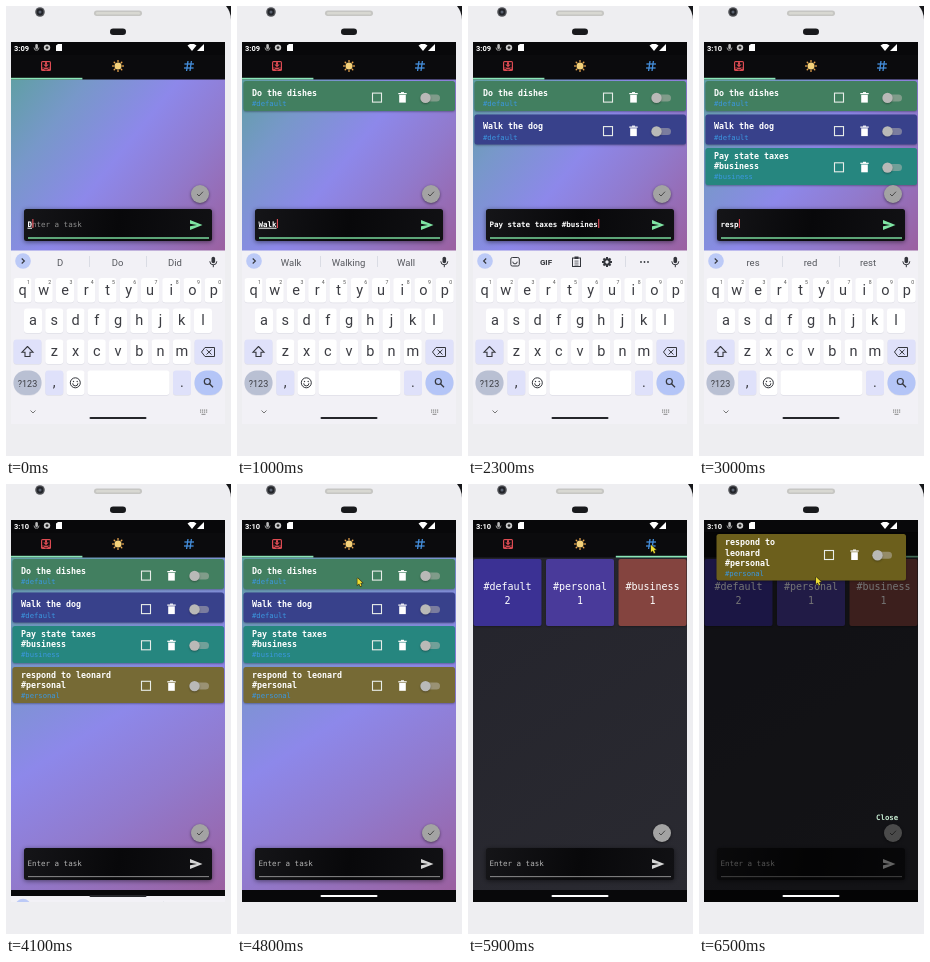
An HTML page with a canvas that plays this animation: 225 by 450 pixels, repeating every 6600 ms.

```html
<!DOCTYPE html>
<html lang="en">
<head>
<meta charset="utf-8">
<title>Task list demo</title>
<style>
html, body { margin: 0; width: 100%; height: 100%; overflow: hidden; background: #eeeef1; }
canvas { display: block; width: 225px; height: 450px; }
</style>
</head>
<body>
<canvas id="stage"></canvas>
<script>
const W = 225, H = 450, LOOP = 6600, STEP = 100;
const MONO = '"DejaVu Sans Mono", "Noto Sans Mono", monospace';
const SANS = 'Roboto, Arial, sans-serif';
const GREEN = '#7fe5a4', BLUE = '#3b97e0', INK = '#34363c';
const canvas = document.getElementById('stage');
const ratio = window.devicePixelRatio || 1;
canvas.width = W * ratio;
canvas.height = H * ratio;
const c = canvas.getContext('2d');
c.scale(ratio, ratio);

// from/to: typing time, add: when the card appears, first: letters at the start
const tasks = [
  { text: 'Do the dishes', from: 0, to: 500, add: 700, first: 1, y: 75, h: 30, color: '#427f60',
    lines: ['Do the dishes'], tag: '#default' },
  { text: 'Walk the dog', from: 900, to: 1400, add: 1500, first: 2, y: 108.5, h: 30, color: '#38418b',
    lines: ['Walk the dog'], tag: '#default' },
  { text: 'Pay state taxes #business', from: 1600, to: 2330, add: 2600, first: 1, y: 142, h: 37, color: '#26867f',
    lines: ['Pay state taxes', '#business'], tag: '#business' },
  { text: 'respond to leonard #personal', from: 2900, to: 3800, add: 4000, first: 1, y: 183, h: 36, color: '#766a35',
    lines: ['respond to leonard', '#personal'], tag: '#personal' }
];
const hints = {
  D: ['D', 'Do', 'Did'], Do: ['Do', 'Don', 'Done'], the: ['the', 'there', 'they'],
  di: ['did', 'do', 'different'], dish: ['dish', 'dishes', 'dished'], Wa: ['Was', 'Want', 'Wait'],
  Walk: ['Walk', 'Walking', 'Wall'], dog: ['dog', 'dogs', 'does'], Pay: ['Pay', 'Paying', 'Pat'],
  state: ['state', 'states', 'stated'], tax: ['tax', 'taxes', 'taxi'], re: ['re', 'red', 'really'],
  resp: ['res', 'red', 'rest'], respond: ['respond', 'responds', 'response'], to: ['to', 'too', 'today']
};
const mousePath = [[4400, 150, 230], [4900, 113, 60], [5200, 113, 60], [5500, 163, 69],
  [5650, 183, 61], [5900, 183, 61], [6200, 112, 104], [6400, 115, 98], [6500, 117, 93]];

const clamp = v => Math.max(0, Math.min(1, v));
const ease = v => { v = clamp(v); return v * v * (3 - 2 * v); };

function rect(x, y, w, h, color) {
  c.fillStyle = color;
  c.fillRect(x, y, w, h);
}
function round(x, y, w, h, r, color) {
  c.fillStyle = color;
  c.beginPath();
  c.roundRect(x, y, w, h, r);
  c.fill();
}
function disc(x, y, r, color) {
  c.fillStyle = color;
  c.beginPath();
  c.arc(x, y, r, 0, 7);
  c.fill();
}
function ring(x, y, r, color, lw = 1) {
  c.strokeStyle = color;
  c.lineWidth = lw;
  c.beginPath();
  c.arc(x, y, r, 0, 7);
  c.stroke();
}
function path(points, color, lw) {
  c.beginPath();
  for (let i = 0; i < points.length; i += 2) c.lineTo(points[i], points[i + 1]);
  if (lw) {
    c.strokeStyle = color;
    c.lineWidth = lw;
    c.stroke();
  } else {
    c.fillStyle = color;
    c.fill();
  }
}
function box(x, y, w, h, color, lw = 1) {
  c.strokeStyle = color;
  c.lineWidth = lw;
  c.strokeRect(x, y, w, h);
}
function label(s, x, y, font, color, align = 'left') {
  c.font = font;
  c.fillStyle = color;
  c.textAlign = align;
  c.textBaseline = 'alphabetic';
  c.fillText(s, x, y);
}
function shadowed(draw, blur = 2, dark = .3) {
  c.save();
  c.shadowColor = `rgba(0,0,0,${dark})`;
  c.shadowBlur = blur * ratio;
  c.shadowOffsetY = ratio;
  draw();
  c.restore();
}
function at(x, y, draw) {
  c.save();
  c.translate(x, y);
  draw();
  c.restore();
}

function drawBody() {
  rect(0, 0, W, H, '#16171a');
  round(-5, -8, 230, 500, 22, '#eeeef1');
  disc(34, 6, 4.8, '#55565b');
  disc(34, 6, 3.4, '#222429');
  disc(34, 6, 1.5, '#5a6270');
  round(88, 4.5, 48, 5.5, 2.7, '#c6c6c3');
  round(90, 6, 44, 2.5, 1.2, '#d8d8d2');
  round(104, 22.5, 16, 6.5, 3.2, '#18191c');
}

function drawStatus(t) {
  rect(5, 36, 214, 13, '#08080a');
  at(0, -.4, () => {
    label(t < 2600 ? '3:09' : '3:10', 8, 45, 'bold 7.5px ' + SANS, '#fff');
    round(29.3, 38.5, 2.6, 5, 1.3, '#bbb');
    path([28, 42, 29, 44.5, 32, 44.5, 33, 42], '#bbb', .8);
    disc(41, 42, 3.2, '#ccc');
    disc(41, 42, 1.4, '#222');
    path([50, 40, 52, 38.5, 56, 38.5, 56, 45.5, 50, 45.5], '#fff');
    path([181.5, 40, 184, 38.5, 188, 38.5, 190.5, 40, 186, 45.5], '#fff');
    path([191, 45.5, 198, 45.5, 198, 38.5], '#fff');
  });
}

function drawTabs(pos) {
  rect(5, 48, 214, 25.5, '#0b0b0d');
  at(40, 60, () => {
    const red = '#dc4b52';
    round(-5, -5, 10, 10, 1.5, red);
    rect(-3.8, -3.8, 7.6, 5.4, '#0b0b0d');
    rect(-1, -3.8, 2, 2.4, red);
    path([-2.8, -1.6, 2.8, -1.6, 0, 1.2], red);
    path([-3.8, 2.6, -2, 2.6, -1, 3.8, 1, 3.8, 2, 2.6, 3.8, 2.6], '#0b0b0d', .7);
  });
  at(112, 60, () => {
    for (let i = 0; i < 8; i++) {
      c.save();
      c.rotate(i * Math.PI / 4);
      rect(-.6, -6, 1.2, 2.2, '#eda84e');
      c.restore();
    }
    disc(0, 0, 3.5, '#f5d27a');
  });
  at(183, 60, () => {
    const col = '#458fdc';
    path([-1, -5, -2.4, 5], col, 1.3);
    path([2.4, -5, 1, 5], col, 1.3);
    path([-4.6, -2, 5, -2], col, 1.3);
    path([-5, 2, 4.6, 2], col, 1.3);
  });
  rect(5 + pos * 71.4, 71.8, 71.4, 1.7, '#8be6b8');
}

function drawTools(x, y) {
  box(x - 4.5, y - 4.5, 9, 9, '#e8ede9', 1.1);
  const tx = x + 25.5;
  rect(tx - 3.3, y - 2.8, 6.6, 7.8, '#fff');
  rect(tx - 4.2, y - 4.6, 8.4, 1.2, '#fff');
  rect(tx - 1.5, y - 5.5, 3, 1.2, '#fff');
  round(x + 45, y - 3.2, 18, 7, 3.5, 'rgba(190,185,180,.5)');
  shadowed(() => disc(x + 48.5, y + .3, 5.2, '#b9b9b7'));
}

function drawCard(k, x, y, w, h, lines, tx, ty, bx, by) {
  shadowed(() => round(x, y, w, h, 2.5, k.color));
  lines.forEach((s, i) => label(s, tx, ty + i * 10.7, 'bold 8.3px ' + MONO, '#fff'));
  label(k.tag, tx, ty + lines.length * 10.4, '7.2px ' + MONO, BLUE);
  drawTools(bx, by);
}

function fillPage(bottom, stops) {
  const g = c.createLinearGradient(5, 73, 219, bottom);
  stops.forEach(([p, col]) => g.addColorStop(p, col));
  rect(5, 73, 214, bottom - 73, g);
}

function drawPages(t, pos, bottom) {
  c.save();
  c.beginPath();
  c.rect(5, 73, 214, bottom - 73);
  c.clip();
  const page = (i, draw) => {
    if (Math.abs(i - pos) < 1) at((i - pos) * 214, 0, draw);
  };
  page(0, () => {
    fillPage(bottom, [[0, '#609fa5'], [.22, '#7798c9'], [.48, '#8d88ea'], [.7, '#917acd'], [1, '#9b60a0']]);
    for (const k of tasks) {
      if (t < k.add) continue;
      c.save();
      c.globalAlpha = clamp((t - k.add + 100) / 200);
      const tall = k.lines.length > 1;
      drawCard(k, 6.5, k.y, 211.5, k.h, k.lines, 15, k.y + (tall ? 10.5 : 14.8), 140, k.y + k.h / 2 + (tall ? .8 : 1.6));
      c.restore();
    }
  });
  page(1, () => fillPage(bottom, [[0, '#a0a67c'], [.22, '#7ba06d'], [.42, '#4d8856'], [.6, '#377847'], [1, '#34704a']]));
  page(2, () => {
    fillPage(bottom, [[0, '#24242c'], [1, '#2a2a31']]);
    const groups = [['#default', 2, '#3b3194'], ['#personal', 1, '#493a9a'], ['#business', 1, '#84443f']];
    groups.forEach(([name, n, col], i) => {
      const x = 5.5 + i * 72.5;
      shadowed(() => round(x, 75, 68, 67, 2, col));
      label(name, x + 34, 106, '10px ' + MONO, '#fff', 'center');
      label(n, x + 34, 120, '10px ' + MONO, '#fff', 'center');
    });
  });
  c.restore();
}

function typed(t) {
  const k = tasks.find(v => t >= v.from && t < v.add);
  if (!k) return ['', k];
  const p = clamp((t - k.from) / (k.to - k.from));
  return [k.text.slice(0, Math.round(k.first + p * (k.text.length - k.first))), k];
}

function drawInput(t, bottom, text, task) {
  const focus = t < 4000;
  const y = bottom - 42;
  shadowed(() => disc(194, y - 15, 9, '#a3a3a3'), 3, .5);
  path([191, y - 15, 193, y - 13, 197, y - 17.3], '#4a4a4a', 1);
  shadowed(() => {
    const g = c.createLinearGradient(18, y, 206, y + 32);
    g.addColorStop(0, '#151518');
    g.addColorStop(.5, '#08080a');
    g.addColorStop(1, '#111114');
    round(18, y, 188, 32, 2.5, g);
  }, 5, .5);
  rect(22, y + 28.3, 181, focus ? 1.4 : .8, focus ? GREEN : '#aaa');
  const font = '7.5px ' + MONO, base = y + 17.5;
  if (!text) label('Enter a task', 21.5, base, font, '#b4b4b4');
  if (t < 100) label('Enter a task', 21.5, base, font, '#8d8d8d');
  label(text, 21.5, base, 'bold ' + font, '#fff');
  if (focus) {
    const wide = c.measureText(text).width;
    if (task && task.y < 120 && text.length < task.text.length) {
      const start = c.measureText(text.slice(0, text.lastIndexOf(' ') + 1)).width;
      rect(21.5 + start, base + 1.2, wide - start, 1, '#fff');
    }
    rect(21.8 + wide, base - 7.5, 1.1, 9, '#e8505b');
  }
  path([184, y + 11, 196.5, y + 16, 184, y + 21, 184, y + 17.2, 191, y + 16, 184, y + 14.8],
    focus ? GREEN : '#d6d6d6');
}

function suggestions(text) {
  const w = text.slice(text.lastIndexOf(' ') + 1);
  if (!w || w[0] === '#') return null;
  for (let s = w; s; s = s.slice(0, -1)) if (hints[s]) return hints[s];
  return [w, w + 's', w + 'ed'];
}

function drawStrip(text) {
  const words = suggestions(text);
  disc(17, 255, 7.8, '#bccaf7');
  if (words) {
    path([15.7, 252.5, 18.4, 255, 15.7, 257.5], INK, 1.1);
    words.forEach((s, i) => label(s, 54 + i * 57.5, 260, '9.5px ' + SANS, '#55575d', 'center'));
    rect(83, 250, .7, 11, '#d0d3dd');
    rect(140, 250, .7, 11, '#d0d3dd');
  } else {
    path([18.2, 252.5, 15.6, 255, 18.2, 257.5], INK, 1.1);
    c.strokeStyle = INK;
    c.lineWidth = 1;
    c.beginPath();
    c.roundRect(42.8, 251.5, 8.5, 8.5, 1.5);
    c.stroke();
    c.beginPath();
    c.arc(47, 255.7, 2.2, 0, Math.PI);
    c.stroke();
    label('GIF', 78, 259, 'bold 8px ' + SANS, INK, 'center');
    box(104.5, 252, 8, 8.5, INK);
    rect(106.5, 250.5, 4, 2.5, INK);
    for (const y of [255, 257, 259]) rect(106.5, y - .3, 4, .7, INK);
    at(139, 256, () => {
      for (let i = 0; i < 8; i++) {
        c.rotate(Math.PI / 4);
        rect(-1, -5, 2, 3, INK);
      }
      ring(0, 0, 2.7, INK, 2);
    });
    for (const x of [173, 176.5, 180]) disc(x, 256, .9, INK);
    rect(157, 250, .7, 11, '#d0d3dd');
  }
  round(205.5, 250.8, 3.6, 6.5, 1.8, INK);
  c.strokeStyle = INK;
  c.lineWidth = 1;
  c.beginPath();
  c.arc(207.3, 255.3, 3.5, 0, Math.PI);
  c.stroke();
  rect(206.8, 258.5, 1, 2.7, INK);
}

function key(x, y, w, ch, color = '#fff', r = 3, size = 14.5) {
  round(x, y + .8, w, 24.5, r, '#dfdfe7');
  round(x, y, w, 24.5, r, color);
  if (ch) label(ch, x + w / 2, y + 16.9, size + 'px ' + SANS, '#3c3d43', 'center');
}

function drawKeyboard(shift, text) {
  at(0, shift, () => {
    rect(5, 244.5, 214, 176, '#f2f1f6');
    drawStrip(text);
    [...'qwertyuiop'].forEach((ch, i) => {
      const x = 7.5 + i * 21.25;
      key(x, 272, 18, ch);
      label((i + 1) % 10, x + 15, 278, '5.2px ' + SANS, '#555', 'center');
    });
    [...'asdfghjkl'].forEach((ch, i) => key(18 + i * 21.25, 302.5, 18, ch));
    [...'zxcvbnm'].forEach((ch, i) => key(39.3 + i * 21.25, 333.5, 18, ch));
    key(7.5, 333.5, 28, '', '#dfe1fa');
    path([21.5, 340.5, 27, 346.2, 24, 346.2, 24, 350.5, 19, 350.5, 19, 346.2, 16, 346.2, 21.5, 340.5], INK, 1.1);
    key(188.5, 333.5, 28, '', '#dfe1fa');
    path([195.5, 346, 199, 341.5, 208.5, 341.5, 208.5, 350.5, 199, 350.5, 195.5, 346], INK, 1);
    path([200.5, 343.7, 205.5, 348.5], INK, 1);
    path([205.5, 343.7, 200.5, 348.5], INK, 1);
    key(7.5, 364.5, 28, '?123', '#b9c0d3', 12, 9);
    key(39.3, 364.5, 18, ',', '#dfe1fa');
    key(60.5, 364.5, 18, '');
    ring(69.3, 376.8, 5, INK, 1);
    disc(67.5, 375.5, .7, INK);
    disc(71.2, 375.5, .7, INK);
    c.beginPath();
    c.arc(69.3, 377.3, 2.6, 0, Math.PI);
    c.stroke();
    key(81.5, 364.5, 82, '');
    key(167, 364.5, 18, '.', '#dfe1fa');
    key(188.5, 364.5, 28, '', '#b4c5f7', 12);
    ring(201.3, 375.5, 3, INK, 1.2);
    path([203.5, 377.7, 207, 381.2], INK, 1.3);
    path([24.5, 404.5, 27, 407, 29.5, 404.5], '#777', 1);
    for (let i = 0; i < 8; i++) rect(194 + i % 4 * 2, 403.5 + (i >> 2) * 2, 1.2, 1.2, '#888');
    rect(195.5, 407.8, 4, 1, '#888');
  });
}

function drawDialog(a) {
  if (a <= 0) return;
  c.save();
  c.globalAlpha = a;
  rect(5, 48, 214, 370, 'rgba(0,0,0,.54)');
  const k = { color: '#6c5f1c', tag: '#personal' };
  drawCard(k, 17.5, 50, 189.5, 46.5, ['respond to', 'leonard', '#personal'], 26, 61, 130, 71);
  label('Close', 177, 335.5, 'bold 7.4px ' + MONO, '#c4e8cf');
  c.restore();
}

function drawMouse(t) {
  const i = mousePath.findIndex(p => p[0] > t);
  if (t < mousePath[0][0]) return;
  let [, x, y] = mousePath[mousePath.length - 1];
  if (i > 0) {
    const [t0, x0, y0] = mousePath[i - 1], [t1, x1, y1] = mousePath[i];
    const p = (t - t0) / (t1 - t0);
    x = x0 + (x1 - x0) * p;
    y = y0 + (y1 - y0) * p;
  }
  at(x, y, () => {
    const arrow = [0, 0, 0, 7, 1.7, 5.6, 3, 8.3, 4.1, 7.7, 3, 5, 5, 4.8, 0, 0];
    path(arrow, '#3a3515', 1.2);
    path(arrow, '#f0df32');
  });
}

function draw(t) {
  const pos = ease((t - 4900) / 300) + ease((t - 5600) / 300);
  const bottom = t < 4000 ? 245 : 406;
  const [text, task] = typed(t);
  drawBody();
  c.save();
  c.beginPath();
  c.rect(5, 36, 214, 382);
  c.clip();
  rect(5, 36, 214, 382, '#08080a');
  drawPages(t, pos, bottom);
  drawInput(t, bottom, text, task);
  drawTabs(pos);
  drawStatus(t);
  const typing = t < 4200;
  if (typing) drawKeyboard(t < 4000 ? 0 : t < 4100 ? 75 : 167.5, text);
  drawDialog(clamp((t - 6100) / 200));
  round(83.5, 411, 57, 2, 1, typing ? '#25262a' : '#fff');
  c.restore();
  drawMouse(t);
}

function tick(now) {
  draw(Math.floor(now % LOOP / STEP) * STEP);
  requestAnimationFrame(tick);
}
draw(0);
requestAnimationFrame(tick);
</script>
</body>
</html>
```
